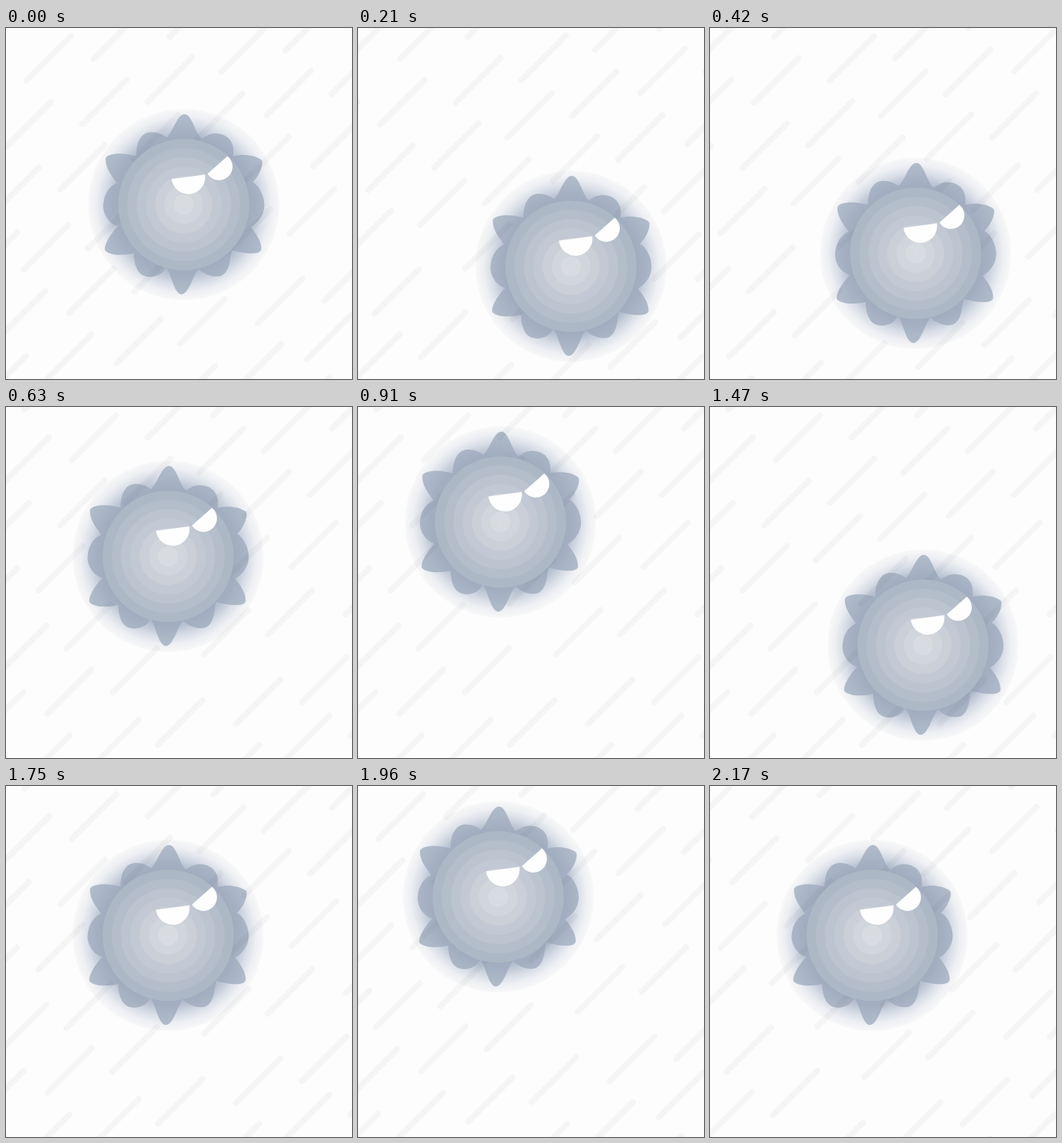
An HTML page for the animation above (2.24 s loop, 464 px wide and 470 px high).

```html
<!DOCTYPE html>
<html lang="en">
<head>
<meta charset="utf-8">
<title>Drifting spiky ball</title>
<style>
  html, body { margin: 0; width: 100%; height: 100%; overflow: hidden; background: #fdfdfd; }
  svg { display: block; width: 100%; height: 100%; }
</style>
</head>
<body>
<svg viewBox="0 0 464 470">
  <defs>
    <radialGradient id="glow" gradientUnits="userSpaceOnUse" cx="0" cy="0" r="128">
      <stop offset=".68" stop-color="#a9b4c7"/>
      <stop offset=".76" stop-color="#bfc8d6"/>
      <stop offset=".84" stop-color="#d9dee7"/>
      <stop offset=".92" stop-color="#edeff3"/>
      <stop offset="1" stop-color="#f8f8f8"/>
    </radialGradient>
    <radialGradient id="petal" gradientUnits="userSpaceOnUse" cx="0" cy="0" r="122">
      <stop offset=".72" stop-color="#a0acbf"/>
      <stop offset="1" stop-color="#b2bdcb"/>
    </radialGradient>
  </defs>
  <g class="ball">
    <circle r="128" fill="url(#glow)"/>
    <path fill="url(#petal)" d="M-23-90C-14-98-9-121 1-121S15-96 24-88
      C34-97 50-98 60-89C66-83 68-74 66-65
      C78-68 95-67 104-60C108-56 102-38 92-30
      C100-27 108-12 108 0S102 22 90 30
      C96 38 104 48 104 59C104 69 78 65 64 61
      C62 78 60 90 51 95C40 99 27 93 20 86
      C13 93 7 120-3 120S-17 92-24 83
      C-28 96-46 100-56 94C-64 89-67 76-67 65
      C-78 68-98 69-105 62C-109 57-98 38-88 29
      C-98 27-109 14-108 0S-100-25-90-29
      C-96-38-105-48-105-61C-104-70-78-70-64-65
      C-64-80-60-90-52-95C-43-100-28-95-23-90Z"/>
  </g>
  <path id="rain" fill="none" stroke="#000" stroke-opacity=".032" stroke-width="8" stroke-linecap="round"/>
  <g class="ball">
    <g id="rings"></g>
    <path fill="#fefefe" d="M-16.3-34.3A22.6 22.6 0 1 0 28.5-40.2Z"/>
    <path fill="#fefefe" d="M31.8-41.2A18.2 18.2 0 1 0 58.7-65Z"/>
  </g>
</svg>
<script>
const STEP = 70, STEPS = 32;
const SWING = [0, 0.415, 0.742, 0.938, 1]; // ease-in-out, middle to turning point
const PERIOD = 234.5, DASH = 59.5, GAP = 60;

// Diagonal rows: [x + y, x - y of a dash's lower end]
const ROWS = [
  [28, 80], [98, -43], [159, 76], [231, -27], [289, 91], [347, -5], [405, 110], [466, -2],
  [525, 114], [597, -7], [656, 105], [733, 237], [792, 61], [847, -40], [902, 80]
];
const SHADES = ["#adb8c6", "#b4becb", "#bbc4cf", "#c3c9d4", "#cacfd8", "#d1d5dc", "#d8dbe0", "#dfe1e4"];

const rain = document.getElementById("rain");
const balls = document.querySelectorAll(".ball");

document.getElementById("rings").innerHTML = SHADES
  .map((c, i) => `<circle r="${i ? 88 - 12.4 * i : 88}" fill="${c}"/>`).join("");

function rainPath(phase) {
  let d = "";
  for (const [sum, base] of ROWS) {
    const split = sum > 300 && sum < 750;
    for (let k = -5; k <= 5; k++) {
      let diff = base + PERIOD * (k - phase);
      if (split && k < 0) diff -= GAP; // wider gap along the seam
      const x = (sum + diff) / 2, y = (sum - diff) / 2;
      if (x < -70 || x > 470 || y < -10 || y > 540) continue;
      d += `M${x.toFixed(1)} ${y.toFixed(1)}l${DASH}-${DASH}`;
    }
  }
  return d;
}

function swing(n) {
  const half = n % 8;
  return SWING[4 - Math.abs(4 - half)] * (n % 16 < 8 ? 1 : -1);
}

const start = performance.now();
let last = -1;

function draw(now) {
  const n = Math.floor(Math.max(0, now - start) / STEP) % STEPS;
  if (n !== last) {
    last = n;
    const s = swing(n);
    const move = `translate(${238.4 + 50.4 * s} ${236.5 + 88 * s})`;
    balls.forEach(b => b.setAttribute("transform", move));
    rain.setAttribute("d", rainPath((n % 4) / 4));
  }
  requestAnimationFrame(draw);
}
draw(start);
</script>
</body>
</html>
```
